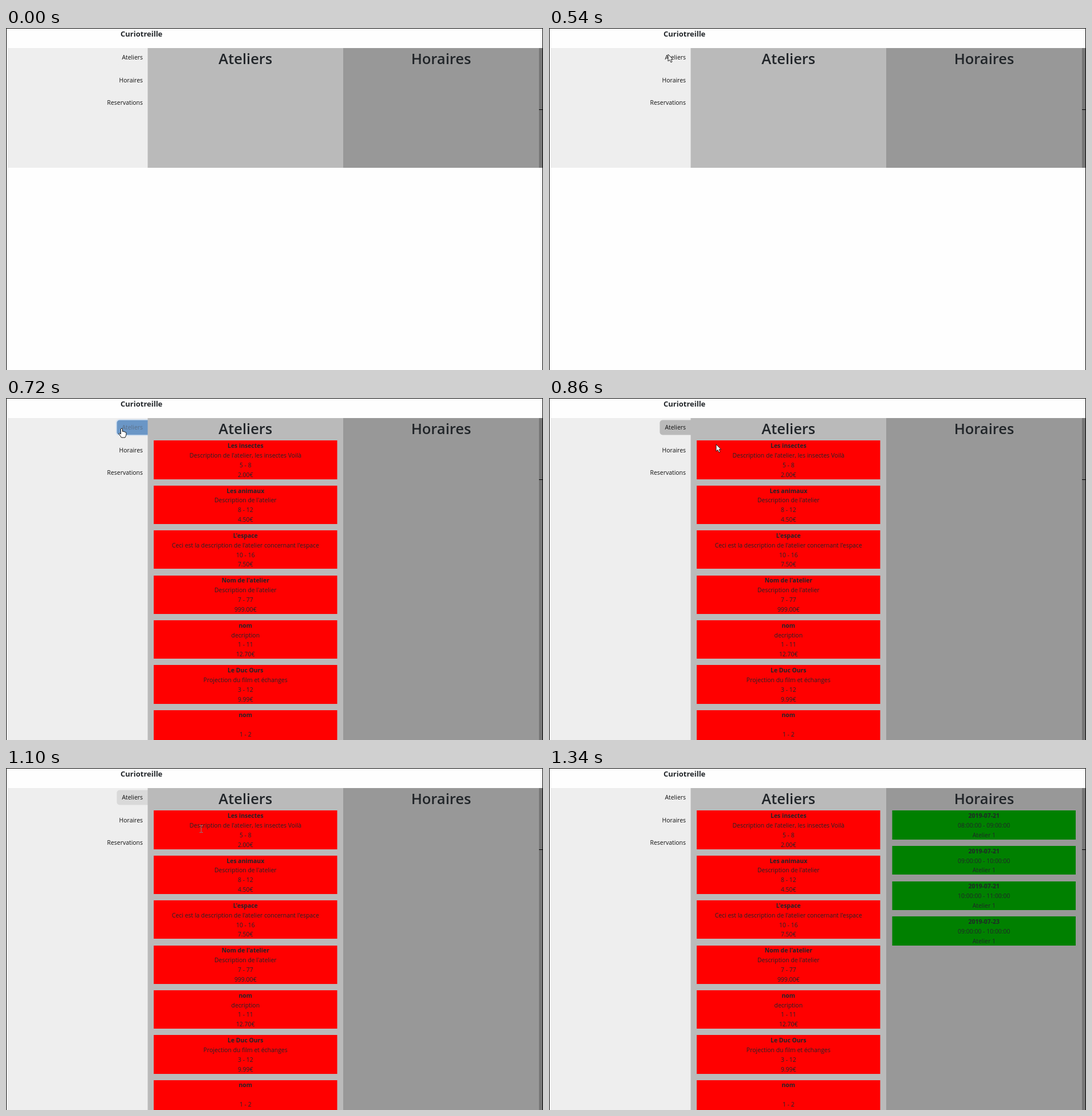
An HTML page that plays this animation: 938x597 px, repeating every 1.74 s.

```html
<!DOCTYPE html>
<html lang="fr">
<head>
<meta charset="utf-8">
<title>Ateliers</title>
<style>
html, body { margin: 0; width: 100%; height: 100%; overflow: hidden; background: #fefefe; }
svg { display: block; font: 10.45px "Open Sans", "Noto Sans", sans-serif; fill: #212529; }
.middle { text-anchor: middle; }
.end { text-anchor: end; fill: #111; }
.bold { font-weight: 700; }
.title { font-size: 13px; font-weight: 700; }
.heading { font-size: 25.5px; font-weight: 600; }
</style>
</head>
<body>
<svg id="stage" width="938" height="597" viewBox="0 0 938 597">
  <rect class="panel" x="2" y="35" width="246" fill="#eee"/>
  <rect id="button" x="193.5" y="38.5" width="70" height="26" rx="5"/>
  <rect id="ring" x="193" y="38" width="70" height="27" rx="5" fill="none" stroke="#a8cdf6" stroke-width="2.5"/>
  <rect class="panel" x="247.5" y="35" width="342" fill="#bababa"/>
  <rect class="panel" x="589" y="35" width="342" fill="#989898"/>
  <rect class="panel" x="931" y="35" width="6" fill="#767676"/>
  <path d="M931 142.5H938M.5 597V.5H937.5V597" fill="none" stroke="#000"/>
  <text class="title" x="200" y="15">Curiotreille</text>
  <text class="end" id="label" x="239" y="55">Ateliers</text>
  <text class="end" x="239" y="95">Horaires</text>
  <text class="end" x="239" y="134">Reservations</text>
  <text class="heading middle" x="418.3" y="63">Ateliers</text>
  <text class="heading middle" x="760" y="63">Horaires</text>
  <g id="workshops"></g>
  <g id="slots"></g>
  <g id="cursor">
    <path id="arrow" d="M0 0V12L2.8 9.5L5 14L7 13L5 8.8H8.5Z" fill="#fff" stroke="#111" stroke-width=".9"/>
    <path id="hand" d="M-1.5 1Q0 -1 1.5 1V5.5Q3 4.5 4 6Q5.5 5 6.2 6.8Q8 6.2 8 8.5V11Q7.5 13.5 6 16H-.5Q-2 13-5 9.5Q-4.5 7.5-1.5 10Z" fill="#fff" stroke="#111"/>
    <path id="beam" d="M-3 -5.5H-.8L0 -5L.8 -5.5H3M0 -5V6M-3 6.5H-.8L0 6L.8 6.5H3" fill="none" stroke="#8a8080"/>
  </g>
</svg>
<script>
const LOOP = 1740, STEP = 20, LINE = 16.8, GAP = 11.2;
const el = id => document.getElementById(id);
const show = (id, on) => el(id).setAttribute("visibility", on ? "visible" : "hidden");

const workshops = [
  ["Les insectes", "Description de l'atelier, les insectes Voilà", "5 - 8", "2.00€"],
  ["Les animaux", "Description de l'atelier", "8 - 12", "4.50€"],
  ["L'espace", "Ceci est la description de l'atelier concernant l'espace", "10 - 16", "7.50€"],
  ["Nom de l'atelier", "Description de l'atelier", "7 - 77", "999.00€"],
  ["nom", "decription", "1 - 11", "12.70€"],
  ["Le Duc Ours", "Projection du film et échanges", "3 - 12", "9.99€"],
  ["nom", "", "1 - 2", ""]
];
const slots = [[21, "08", "09"], [21, "09", "10"], [21, "10", "11"], [23, "09", "10"]]
  .map(([day, from, to]) => [`2019-07-${day}`, `${from}:00:00 - ${to}:00:00`, "Atelier 1"]);

// Stacks cards of centred lines, the first line bold
function stack(id, cards, x, color) {
  let top = 74.3, svg = "";
  for (const lines of cards) {
    const y = Math.round(top), height = lines.length * LINE;
    svg += `<rect x="${x}" y="${y}" width="320.5" height="${Math.round(top + height) - y}" fill="${color}"/>`;
    lines.forEach((line, i) => {
      svg += `<text class="middle${i ? "" : " bold"}" x="${x + 160.3}" y="${Math.round(top + 12.8 + i * LINE)}">${line}</text>`;
    });
    top += height + GAP;
  }
  el(id).innerHTML = svg;
}
stack("workshops", workshops, 258, "#f00");
stack("slots", slots, 599.5, "#008000");

// Keys are [time, ...values], interpolated linearly
function track(keys, t) {
  const next = keys.findIndex(key => key[0] > t);
  if (next < 0) return keys[keys.length - 1].slice(1);
  if (!next) return keys[0].slice(1);
  const a = keys[next - 1], b = keys[next], p = (t - a[0]) / (b[0] - a[0]);
  return a.slice(1).map((v, i) => v + (b[i + 1] - v) * p);
}
const gray = (t, v) => [t, v, v, v];
const rgb = values => `rgb(${values.map(Math.round)})`;

const buttonKeys = [gray(540, 238), gray(640, 186), [700, 47, 120, 203], [720, 106, 150, 198],
  gray(840, 186), gray(1050, 186), gray(1100, 217), gray(1200, 238)];
const labelKeys = [gray(640, 17), [700, 180, 188, 198], [720, 92, 113, 137], gray(840, 17)];
const ringKeys = [[640, 0], [700, 1], [720, .3], [780, 0]];
const pathKeys = [[360, 240, 2], [440, 225, 21], [520, 210, 43], [600, 202, 53], [720, 202, 53],
  [860, 292, 81], [900, 312, 91], [1000, 338, 104], [1100, 341, 106], [1140, 345, 107], [1340, 936, 118]];

function draw(t) {
  const height = t < 720 ? 209 : 562;
  document.querySelectorAll(".panel").forEach(p => p.setAttribute("height", height));
  show("workshops", t >= 720);
  show("slots", t >= 1120);
  el("button").setAttribute("fill", rgb(track(buttonKeys, t)));
  el("label").style.fill = rgb(track(labelKeys, t));
  el("ring").setAttribute("opacity", track(ringKeys, t)[0]);

  const visible = t >= 360 && t < 1340;
  const hand = t >= 580 && t < 760, beam = t >= 980 && t < 1160;
  show("hand", visible && hand);
  show("beam", visible && beam);
  show("arrow", visible && !hand && !beam);
  el("cursor").setAttribute("transform", `translate(${track(pathKeys, t).map(Math.round)})`);
}

const start = performance.now();
function tick() {
  const t = (performance.now() - start) % LOOP;
  draw(Math.floor(t / STEP) * STEP);
  requestAnimationFrame(tick);
}
tick();
</script>
</body>
</html>
```
